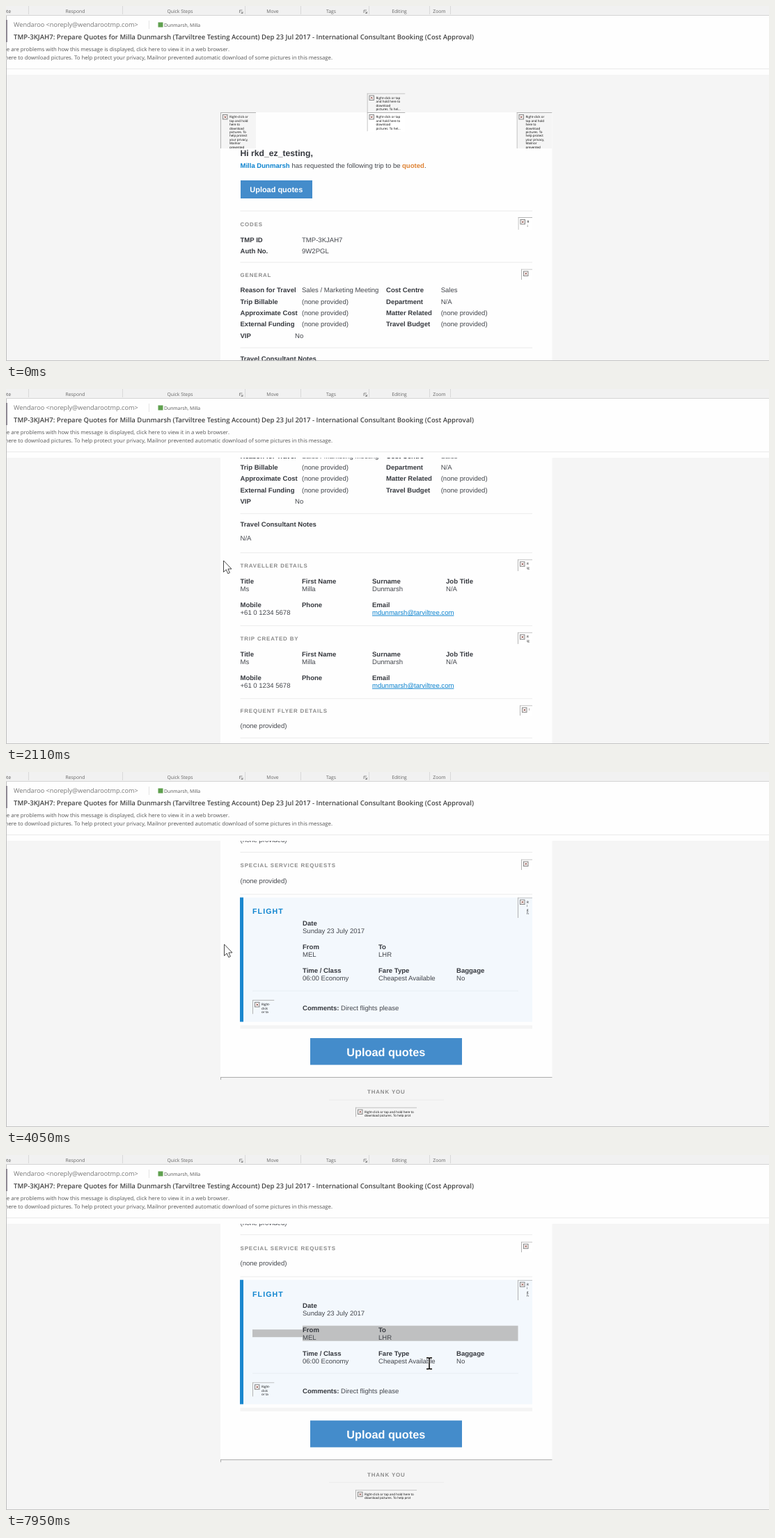
An HTML page for the animation above (8 s loop, 1096x511 px).

```html
<!DOCTYPE html>
<html lang="en">
<head>
<meta charset="utf-8">
<title>Quote request mail</title>
<style>
  html, body { margin: 0; width: 100%; height: 100%; overflow: hidden; background: #f5f5f5; }
  svg { display: block; text-rendering: geometricPrecision; }
  .ui { font-family: "Open Sans", "Noto Sans", sans-serif; }
  .mail { font-family: "Liberation Sans", Arial, sans-serif; font-size: 9.55px; fill: #43464c; }
  .b { font-weight: bold; fill: #36393f; }
  .head { font-weight: bold; font-size: 7.9px; letter-spacing: .88px; fill: #8a8a8a; }
  .tiny { font-family: "Open Sans", "Noto Sans", sans-serif; font-size: 4.5px; fill: #000; }
</style>
</head>
<body>
<svg id="stage" width="1096" height="511" viewBox="0 0 1096 511"></svg>
<script>
const LOOP = 8000;
const NAME = ["Milla", "Dunmarsh"];
const MAIL = "mdunmarsh@tarviltree.com";

const rect = (x, y, w, h, fill, extra = "") =>
  `<rect x="${x}" y="${y}" width="${w}" height="${h}" fill="${fill}" ${extra}/>`;

// y is the middle of the capitals
const text = (x, y, str, cls = "", size = 9.55, extra = "") =>
  `<text x="${x}" y="${y + size * .36}" class="${cls}" style="font-size:${size}px" ${extra}>` +
  str.replace(/</g, "&lt;") + "</text>";

const bold = (x, y, str) => text(x, y, str, "b");
const head = (y, str, x = 336.5) => text(x, y, str, "head", 7.9);
const rule = (y, x = 336.5, w = 419.5) => rect(x, y, w, 1, "#ebebeb");
const row = (y, label, value, x = 336.5, vx = 425) => bold(x, y, label) + text(vx, y, value);
const stack = (x, y, label, value) => bold(x, y, label) + text(x, y + 11, value);

let clips = 0;
// placeholder of a blocked picture
function blocked(x, y, w, h, lines = [], fill = "#fff") {
  const id = "c" + clips++;
  return `<clipPath id="${id}">${rect(x, y, w, h, "#000")}</clipPath><g clip-path="url(#${id})">` +
    rect(x, y, w, h, fill) + rect(x, y, w, 1, "#b4b4b4") + rect(x, y, 1, h, "#b4b4b4") +
    rect(x + 3.5, y + 3.5, 6.5, 6.5, "#fff", 'stroke="#777" stroke-width=".9"') +
    `<path d="M${x + 5.3} ${y + 5.3}l3 3m0-3l-3 3" stroke="#8a4a42" stroke-width="1"/>` +
    lines.map((s, i) => text(x + 13, y + 6.6 + i * 5.45, s, "tiny", 4.5)).join("") + "</g>";
}

function person(y, title) {
  return head(y, title) + blocked(735, y - 9, 21, 17, ["R", "ig"]) +
    stack(336.5, y + 22, "Title", "Ms") + stack(425, y + 22, "First Name", NAME[0]) +
    stack(526, y + 22, "Surname", NAME[1]) + stack(632, y + 22, "Job Title", "N/A") +
    stack(336.5, y + 56, "Mobile", "+61 0 1234 5678") + bold(425, y + 56, "Phone") +
    bold(526, y + 56, "Email") +
    text(526, y + 67, MAIL, "", 9.55, 'fill="#0e84cf" text-decoration="underline"') + rule(y + 86);
}

function page() {
  const side = ["Right-click or", "tap and hold", "here to", "download", "pictures. To",
    "help protect", "your privacy,", "Mailnor", "prevented"];
  const top = ["Right-click or tap", "and hold here to", "download", "pictures. To hel..."];
  const none = "(none provided)";
  const white = 'font-weight="bold" fill="#fff"';
  return rect(308, 153, 476.5, 986, "#fefefe") +
    blocked(518.5, 125.5, 55, 27.5, top, "#f5f5f5") + blocked(518.5, 153, 55, 27.5, top) +
    blocked(308, 153, 51, 52, side, "#f5f5f5") + blocked(733.5, 153, 51, 52, side, "#f5f5f5") +
    text(336.5, 212, "Hi rkd_ez_testing,", "b", 12.2) +
    text(336.5, 230, NAME.join(" "), "", 9.55, 'font-weight="bold" fill="#0e84cf"') +
    text(410.5, 230, "has requested the following trip to be") +
    text(569, 230, "quoted", "", 9.55, 'font-weight="bold" fill="#de8233"') + text(601, 230, ".") +
    rect(337, 251, 103, 26, "#448ccb") + text(350.3, 264.5, "Upload quotes", "", 10.95, white) +
    rule(294.5) + head(314, "CODES") + blocked(735.5, 304, 20.5, 18, ["R", "i"]) +
    row(336.5, "TMP ID", "TMP-3KJAH7") + row(353, "Auth No.", "9W2PGL") +
    rule(368.5) + head(387, "GENERAL") + blocked(740, 378.5, 16, 15.5) +
    row(409, "Reason for Travel", "Sales / Marketing Meeting") + row(409, "Cost Centre", "Sales", 546, 624.7) +
    row(425.3, "Trip Billable", none) + row(425.3, "Department", "N/A", 546, 624.7) +
    row(441.6, "Approximate Cost", none) + row(441.6, "Matter Related", none, 546, 624.7) +
    row(458, "External Funding", none) + row(458, "Travel Budget", none, 546, 624.7) +
    row(474.3, "VIP", "No", 336.5, 415) +
    rule(491.5) + bold(336.5, 507.5, "Travel Consultant Notes") + text(336.5, 527.3, "N/A") + rule(548) +
    person(567, "TRAVELLER DETAILS") + person(672, "TRIP CREATED BY") +
    head(776, "FREQUENT FLYER DETAILS") + blocked(738, 768, 18, 15, ["!"]) + text(336.5, 797.5, none) + rule(814.5) +
    head(834, "SPECIAL SERVICE REQUESTS") + blocked(740, 825, 16, 15.5) + text(336.5, 856, none) + rule(875) +
    rect(336, 880, 420, 179, "#f3f8fd") + rect(336, 880, 5, 179, "#1a87ce") +
    '<g id="sel"></g>' +
    text(354, 900, "FLIGHT", "", 10.6, 'font-weight="bold" fill="#0e84cf" letter-spacing="1.1"') +
    blocked(735, 880, 21, 29.5, ["R", "i", "g", "h"], "#f3f8fd") +
    stack(426, 917, "Date", "Sunday 23 July 2017") +
    stack(426, 951.4, "From", "MEL") + stack(535, 951.4, "To", "LHR") +
    stack(426, 985.5, "Time / Class", "06:00 Economy") + stack(535, 985.5, "Fare Type", "Cheapest Available") +
    stack(647, 985.5, "Baggage", "No") + rect(354, 1014, 382, 1, "#e8eef3") +
    blocked(354, 1027.5, 31.5, 20.5, ["Right-", "click", "or ta"], "#f3f8fd") +
    row(1039.5, "Comments:", "Direct flights please", 426, 481) +
    rect(336.5, 1064, 419.5, 5, "#f4f4f4") +
    rect(437, 1082.5, 218, 38.5, "#448ccb") + text(489.3, 1102.7, "Upload quotes", "", 16.27, white) +
    rect(308, 1138.5, 476.5, 1, "#ababab") + rect(308, 1138.5, 1, 4, "#ababab") +
    head(1160, "THANK YOU", 519) + rule(1171, 464, 165) +
    blocked(502, 1182, 88, 14, ["Right-click or tap and hold here to", "download pictures. To help prot"], "#f5f5f5");
}

function chrome() {
  const labels = [["Respond", 99.5], ["Quick Steps", 250], ["Move", 383], ["Tags", 467], ["Editing", 565], ["Zoom", 622.5]];
  const mid = 'text-anchor="middle" fill="#666"', end = 'text-anchor="end" fill="#555"';
  const opener = x => `<path d="M${x} 10V6h4m-2.5 1.5l3 3m0-2.5v2.5h-2.5" fill="none" stroke="#777" stroke-width=".8"/>`;
  return rect(0, 0, 1096, 99, "#fefefe") + rect(0, 0, 1096, 13, "#f1f1f1") + rect(0, 13, 1096, 1, "#d4d4d4") +
    [32, 167, 343, 423, 521, 608, 638].map(x => rect(x, 0, 1, 12, "#d9d9d9")).join("") +
    labels.map(([s, x]) => text(x, 8, s, "ui", 6.8, mid)).join("") + text(7, 8, "Delete", "ui", 6.8, end) +
    opener(335.5) + opener(514) +
    text(11, 27, "Wendaroo <noreply@wendarootmp.com>", "ui", 9.15, 'fill="#777"') +
    rect(205, 21, 1, 12, "#e4e4e4") + rect(218.5, 23.5, 7, 7, "#5fa04e") +
    text(227, 27.3, "Dunmarsh, Milla", "ui", 6.8, 'fill="#555"') +
    text(11, 44.8, `TMP-3KJAH7: Prepare Quotes for ${NAME.join(" ")} (Tarviltree Testing Account) Dep 23 Jul 2017 - ` +
      "International Consultant Booking (Cost Approval)", "ui", 9.58, 'font-weight="600" fill="#444"') +
    text(321, 62, "If there are problems with how this message is displayed, click here to view it in a web browser.", "ui", 7.75, end) +
    text(469, 73.8, "Click here to download pictures. To help protect your privacy, Mailnor prevented automatic download " +
      "of some pictures in this message.", "ui", 7.8, end) +
    rect(0, 90, 1096, 1, "#e9e9e9") + rect(0, 14, 1, 497, "#bdbdbd") + rect(0, 20, 2, 32, "#8f8a94") +
    rect(0, 510, 1096, 1, "#c4c4c4");
}

const ARROW = '<path d="M0 0V16.5L3.8 13L6.3 18.7L8.9 17.5L6.4 12H11.5Z" fill="#fff" stroke="#333" stroke-width=".9"/>';
const BEAM_PATH = "M-4-8h3l1 1l1-1h3M0-7V7M-4 8h3l1-1l1 1h3";
const BEAM = [["#fff", 3], ["#000", 1.5]].map(([c, w]) =>
  `<path d="${BEAM_PATH}" fill="none" stroke="${c}" stroke-width="${w}"/>`).join("");

const stage = document.getElementById("stage");
stage.innerHTML = `<clipPath id="view">${rect(0, 99, 1096, 412, "#000")}</clipPath>` +
  rect(0, 0, 1096, 511, "#f5f5f5") +
  `<g clip-path="url(#view)"><g id="page" class="mail">${page()}</g></g>` + chrome() +
  `<g id="cursor"><g id="arrow">${ARROW}</g><g id="beam">${BEAM}</g></g>`;
const [pageEl, sel, cursor, arrow, beam] =
  ["page", "sel", "cursor", "arrow", "beam"].map(id => document.getElementById(id));

const SCROLL = [[620, 0], [940, 83], [2110, 312.5], [3120, 547], [3350, 547], [3740, 672], [3980, 672],
  [4050, 699], [4360, 838], [4750, 838], [5620, 700.3]];
const POINTER = [[90, 942, 470], [550, 238, 208], [940, 238, 208], [1490, 305, 240], [2110, 312.5, 247],
  [3120, 313.5, 248], [4430, 313.5, 248], [4660, 482, 205], [4830, 482, 205], [5620, 434, 262],
  [6010, 434, 262], [6080, 429, 262], [6790, 566, 271], [6950, 566, 271], [7100, 548, 454],
  [7250, 527, 299], [7500, 527, 299], [7950, 608, 300]];

function at(keys, t) {
  const i = keys.findIndex(k => k[0] > t);
  if (i < 0) return keys[keys.length - 1].slice(1);
  if (i === 0) return keys[0].slice(1);
  const a = keys[i - 1], b = keys[i], p = (t - a[0]) / (b[0] - a[0]);
  return a.slice(1).map((v, j) => v + (b[j + 1] - v) * p);
}

// letters first, then whole cells, then the full row
function selection(t, x) {
  const mark = (...box) => rect(...box, "#bfc0c1");
  if (t <= 6080) return "";
  if (t >= 6780) return mark(426, 946, 309.5, 22) + mark(354, 951.5, 72, 11);
  if (x >= 535) return mark(426, 946, 221, 22);
  return mark(426, 956.5, Math.min(x, 446) - 426, 11.5);
}

function draw(now) {
  const t = now % LOOP, [x, y] = at(POINTER, t);
  pageEl.setAttribute("transform", `translate(0 ${-at(SCROLL, t)[0]})`);
  cursor.setAttribute("transform", `translate(${x} ${y})`);
  cursor.style.display = t < 90 ? "none" : "";
  arrow.style.display = t < 4500 ? "" : "none";
  beam.style.display = t < 4500 ? "none" : "";
  sel.innerHTML = selection(t, x);
  requestAnimationFrame(draw);
}
requestAnimationFrame(draw);
</script>
</body>
</html>
```
